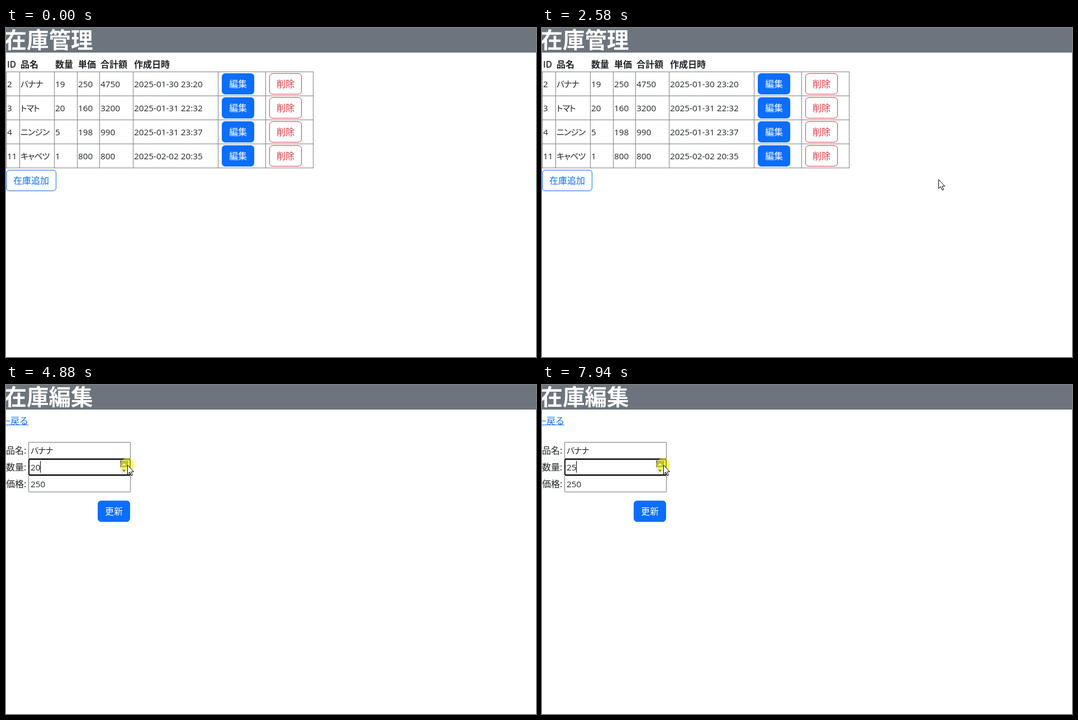
Recreate the animation shown at these times as an HTML page. Size 948x589 px, loop 8000 ms.

```html
<!DOCTYPE html>
<html lang="ja">
<head>
<meta charset="utf-8">
<title>在庫管理</title>
<style>
html, body { margin: 0; height: 100%; overflow: hidden; background: #fff; }
svg { display: block; width: 948px; height: 589px; font: 16px "Noto Sans CJK JP", sans-serif; fill: #212529; }
.num { font: 15.3px "Open Sans", sans-serif; }
.kana { font-size: 15px; font-feature-settings: "palt"; letter-spacing: -1px; }
.head { font-weight: 600; }
.id { font: 600 15.3px "Open Sans", sans-serif; }
.title { font-size: 39.5px; font-weight: 700; fill: #fff; }
.link { fill: #0d6efd; }
.grid { stroke: #808080; fill: none; }
.btn { --c: #0d6efd; }
.btn rect { fill: #fff; stroke: var(--c); }
.btn text { fill: var(--c); text-anchor: middle; font-weight: 300; }
.btn.solid rect, .btn.red.hover rect { fill: var(--c); }
.btn.solid text, .btn.red.hover text { fill: #fff; font-weight: 400; }
.btn.solid.hover { --c: #0b5ed7; }
.btn.red { --c: #dc3545; }
.input { fill: #fff; stroke: #767676; }
.cursor { fill: #fff; stroke: #000; stroke-linejoin: round; }
</style>
</head>
<body>
<svg viewBox="0 0 948 589">
  <rect width="948" height="44" fill="#6c757d"/>
  <text id="title" class="title" x="-2.5" y="36"></text>
  <g id="list"></g>
  <g id="edit">
    <text class="link" x="-8" y="70">←戻る</text>
    <path d="M0 71.5H40" stroke="#0d6efd"/>
  </g>
  <g id="spinner">
    <rect id="up" x="204" y="135" width="15" height="12.5"/>
    <rect id="down" x="204" y="147.5" width="15" height="12"/>
    <path id="upArrow" d="M207.5 144l3.75-4 3.75 4z"/>
    <path d="M207.5 151.5l3.75 4 3.75-4z" fill="#404040"/>
  </g>
  <g id="focus">
    <rect x="41" y="133" width="181" height="28" rx="2" fill="none" stroke="#101010" stroke-width="2"/>
    <path id="caret" d="M61.5 136V157" stroke="#000"/>
  </g>
  <circle id="click" r="12.3" fill="#ff0" fill-opacity=".55"/>
  <path id="arrow" class="cursor" d="M.5.5V16.5L4.2 13 6.8 19.2 9.3 18.2 6.7 12.2H11.5z"/>
  <g id="hand" class="cursor">
    <path d="M-2 13V1.8a1.8 1.8 0 0 1 3.6 0V8c.3-1.4 3-1.2 3.2.4c.4-1.2 2.6-1 2.8.6c.4-1 2.4-.6 2.4 1V15c0 3-1.8 4-1.8 7.5H.2c0-2-4-6-5.6-9.3c-1-2.2 1.4-3 3.4-.2z"/>
    <path d="M1.6 8v4M4.8 8.5v3.5M7.6 9.5v3" fill="none"/>
  </g>
</svg>
<script>
const $ = id => document.getElementById(id);

function add(parent, tag, attrs, content = '') {
  const el = document.createElementNS('http://www.w3.org/2000/svg', tag);
  for (const k in attrs) el.setAttribute(k, attrs[k]);
  el.textContent = content;
  parent.append(el);
  return el;
}
const text = (parent, x, y, content, cls = '') => add(parent, 'text', { x, y, class: cls }, content);

function button(parent, x, y, label, cls, w = 58) {
  const el = add(parent, 'g', { class: 'btn ' + cls });
  add(el, 'rect', { x: x + .5, y: y + .5, width: w - 1, height: 37, rx: 5.5 });
  text(el, x + w / 2, y + 25, label);
  return { el, x, y, w };
}

// Stock list
const columns = [0, 24, 86, 127, 167, 227, 379, 464, 549];
const rows = [
  ['2', 'バナナ', '19', '250', '4750', '2025-01-30 23:20'],
  ['3', 'トマト', '20', '160', '3200', '2025-01-31 22:32'],
  ['4', 'ニンジン', '5', '198', '990', '2025-01-31 23:37'],
  ['11', 'キャベツ', '1', '800', '800', '2025-02-02 20:35'],
];
const buttons = [];
['ID', '品名', '数量', '単価', '合計額', '作成日時'].forEach((label, i) =>
  text($('list'), columns[i] + 2, 71, label, i ? 'head' : 'id'));
rows.forEach((row, r) => {
  const y = 78 + 43 * r;
  row.forEach((cell, i) => text($('list'), columns[i] + 2, y + 28, cell, i === 1 ? 'kana' : 'num'));
  buttons.push(button($('list'), 386, y + 3, '編集', 'solid'),
               button($('list'), 471, y + 3, '削除', 'red'));
});
add($('list'), 'path', {
  class: 'grid',
  d: [0, 1, 2, 3, 4].map(r => `M0 ${78.5 + 43 * r}H550`).join('') +
     columns.map(x => `M${x + .5} 78V251`).join(''),
});
button($('list'), 0, 254, '在庫追加', '', 90);

// Edit form
const fields = [['品名:', 'バナナ'], ['数量:', ''], ['価格:', '250']].map(([label, value], i) => {
  const y = 102 + 30 * i;
  text($('edit'), 0, y + 21, label);
  const box = add($('edit'), 'rect', { class: 'input', x: 40.5, y: y + .5, width: 182, height: 29, rx: 1.5 });
  return { box, value: text($('edit'), 44, y + 21, value, i ? 'num' : 'kana') };
});
button($('edit'), 164, 207, '更新', 'solid');

// Pointer moves in visible steps: start, interval, first step, last step, from, to, easing
const smooth = u => u * u * (3 - 2 * u);
const moves = [
  [390, 82, 0, 5, [742, 351], [457, 88], u => 1 - (1 - u) ** 1.35],
  [1000, 70, 1, 4, [457, 88], [410, 102], smooth],
  [2090, 70, 0, 7, [419, 105], [709, 271], smooth],
  [3510, 70, 1, 12, [709, 271], [217, 151], smooth],
  [4480, 70, 1, 1, [217, 151], [217, 143], smooth],
];
function pointerAt(t) {
  const move = moves.findLast(m => t >= m[0]);
  if (!move) return [-99, -99];
  const [start, interval, first, last, from, to, ease] = move;
  const u = ease(Math.min(last, first + Math.floor((t - start) / interval)) / last);
  return from.map((a, i) => Math.round(a + (to[i] - a) * u));
}

const EDIT_AT = 3110, BLINK = 535;
const linkClick = [1670, 1810];
const spinClicks = [[4880, 4950], [5620, 5760], [7020, 7150], [7350, 7480], [7580, 7680], [7940, 8000]];
const pressed = (t, [down, up]) => t >= down && t < up;
const show = (el, on) => el.style.display = on ? '' : 'none';

function render(t) {
  const editing = t >= EDIT_AT;
  const [x, y] = pointerAt(t);
  const place = `translate(${x} ${y})`;

  $('title').textContent = editing ? '在庫編集' : '在庫管理';
  show($('list'), !editing);
  show($('edit'), editing);

  let overButton = false;
  for (const b of buttons) {
    const over = !editing && x >= b.x && x < b.x + b.w && y >= b.y && y < b.y + 38;
    b.el.classList.toggle('hover', over);
    overButton ||= over;
  }

  const done = spinClicks.filter(c => t >= c[0]);
  const spinning = spinClicks.some(c => pressed(t, c));
  const overInput = editing && x < 223 && y >= 132 && y < 162;
  const overUp = y < 147;
  fields[1].value.textContent = 19 + done.length;
  fields[1].box.style.stroke = overInput ? '#444' : '';
  show($('spinner'), overInput);
  $('up').style.fill = spinning ? '#787878' : overUp ? '#d2d2d2' : '#f1f1f1';
  $('down').style.fill = overUp ? '#f1f1f1' : '#d2d2d2';
  $('upArrow').style.fill = spinning ? '#fff' : '#404040';

  show($('focus'), done.length);
  if (done.length) show($('caret'), Math.floor((t - done.at(-1)[0]) / BLINK) % 2 === 0);

  show($('click'), spinning || pressed(t, linkClick));
  show($('arrow'), !overButton);
  show($('hand'), overButton);
  for (const id of ['click', 'arrow', 'hand']) $(id).setAttribute('transform', place);
}

function tick() {
  render(performance.now() % 8000);
  requestAnimationFrame(tick);
}
tick();
</script>
</body>
</html>
```
